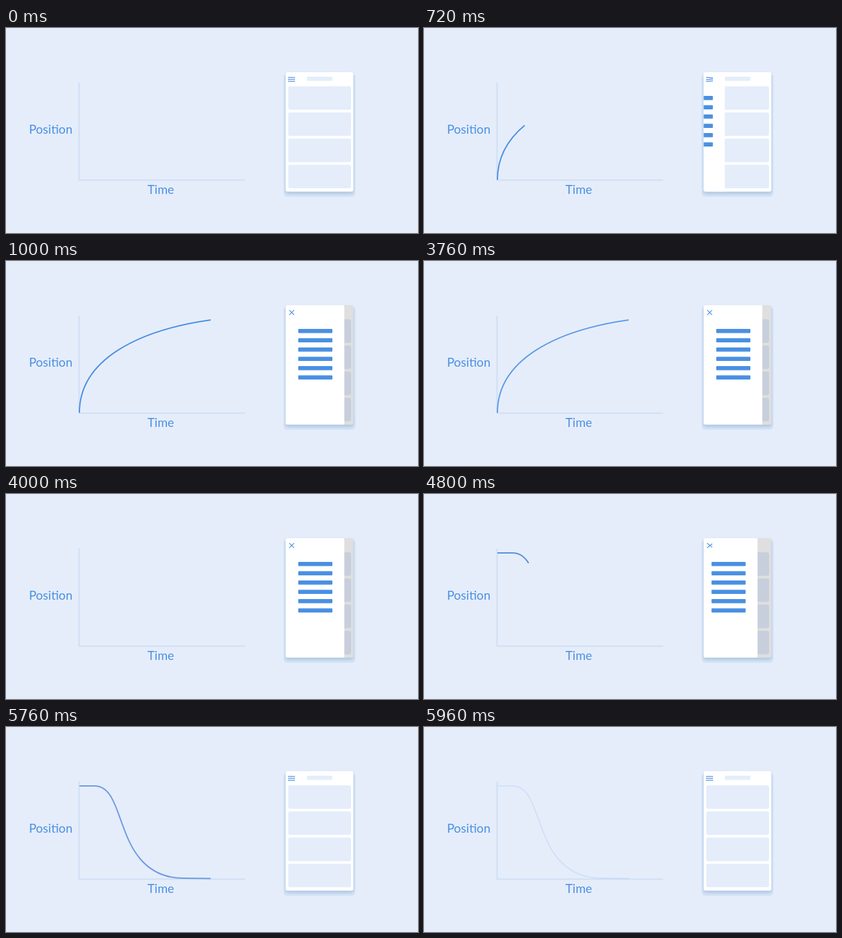
Animation of 640x320 px, one loop 6 s. Source, as an HTML page:

```html
<!DOCTYPE html>
<html lang="en">
<head>
<meta charset="utf-8">
<title>Menu easing</title>
<style>
  html, body { margin: 0; height: 100%; overflow: hidden; background: #e5edfb; }
  svg { display: block; width: 100vw; height: 100vh; }
  text { font: 19px Lato, "Open Sans", sans-serif; fill: #4a90e2; }
  .axis { stroke: #d0dff4; stroke-width: 2; fill: none; }
  .curve { stroke-width: 2; fill: none; }
  .shadow { fill: #fff; filter: drop-shadow(0 3px 2px #a9c4e3); }
  #icon { stroke: #4a90e2; stroke-width: 1.2; }
</style>
</head>
<body>
<svg viewBox="0 0 640 320">
  <clipPath id="screen"><rect x="434.5" y="69" width="105" height="186.5" rx="3"/></clipPath>

  <path class="axis" d="M113.5 85V237.5H371.5"/>
  <text x="35.7" y="165">Position</text>
  <text x="219.7" y="259">Time</text>
  <path id="rise" class="curve" stroke="#4a90e2" pathLength="1"
    d="M114 237C114 154 205 108 318 92"/>
  <path id="fall" class="curve" stroke="#5a8fda" pathLength="1"
    d="M114 92H138C162 92 170 123 180 150C190 177 208 236 276 236L318 236.5"/>

  <rect x="431.5" y="72" width="111" height="191.5" rx="5" fill="#d6e3f5"/>
  <rect class="shadow" x="434.5" y="69" width="105" height="186.5" rx="3"/>
  <g clip-path="url(#screen)">
    <g id="cards" fill="#e5edfb">
      <rect x="467.5" y="76" width="39.5" height="6.5" rx="1"/>
    </g>
    <rect id="dim" x="434" y="69" width="106" height="187"/>
    <g id="menu" fill="#4a90e2">
      <rect x="420" y="69" width="105.5" height="186.5" rx="1.5" fill="#fff"/>
    </g>
  </g>
  <g id="icon"><line/><line/><line/></g>
</svg>
<script>
const $ = id => document.getElementById(id);
const clamp = v => Math.min(1, Math.max(0, v));
const lerp = (a, b, p) => a + (b - a) * p;
const STEP = 40, LOOP = 6000;

function addRect(parent, x, y, width, height, rx) {
  const rect = document.createElementNS('http://www.w3.org/2000/svg', 'rect');
  for (const [name, value] of Object.entries({ x, y, width, height, rx })) rect.setAttribute(name, value);
  parent.append(rect);
}
for (let i = 0; i < 4; i++) addRect($('cards'), 438.5, 91 + i * 40.8, 97.5, 36.8, 3);
for (let i = 0; i < 6; i++) addRect($('menu'), 454, 106 + i * 14.5, 53, 6.4, 1);

function drawCurve(path, trim, opacity) {
  path.style.strokeDasharray = `${trim} 2`;
  path.style.opacity = trim ? opacity : 0;
}

// Top, middle and bottom bars: menu pose and cross pose as x1, y1, x2, y2
const bars = [
  [[438, 77.2, 449, 77.2], [440, 76.7, 447.5, 84.2]],
  [[438, 80.2, 449, 80.2], [440, 84.2, 447.5, 76.7]],
  [[438, 83.2, 449, 83.2], [440, 84.2, 447.5, 76.7]]
];
function drawIcon(p) {
  [...$('icon').children].forEach((line, i) => {
    const [from, to] = bars[i];
    ['x1', 'y1', 'x2', 'y2'].forEach((name, j) => line.setAttribute(name, lerp(from[j], to[j], p)));
    line.style.opacity = i === 1 ? clamp(1.2 - 2 * p) : 1;
  });
}

function draw(time) {
  const t = Math.floor(time % LOOP / STEP) * STEP;
  const steps = start => (t - start) / STEP;
  const fade = start => 1 - clamp((steps(start) + 1) / 7);
  let open = 0, dim = 0, cross = 0, rise = 0, fall = 0, tint = 0;

  if (t >= 720 && t < 4800) {
    const k = steps(720);
    open = rise = 1 - (1 - clamp(.2 + .8 * k / 7)) ** 2;
    dim = clamp(k / 7);
    cross = clamp((k + .8) / 7.8);
  } else if (t >= 4800) {
    const k = steps(4800), p = clamp(.175 + .213 * k);
    open = 1 - p * p * (3 - 2 * p);
    dim = 1 - clamp((k + 1) / 6) ** 2.6;
    tint = 1 - dim;
    cross = clamp(.85 - .2 * k);
    fall = k < 3 ? lerp(.194, .524, k / 3) : lerp(.524, 1, clamp((k - 3) / 2));
  }

  drawCurve($('rise'), rise, fade(3760));
  drawCurve($('fall'), fall, fade(5760));
  $('menu').setAttribute('transform', `translate(${-91 * (1 - open)} 0)`);
  $('menu').style.opacity = open ? 1 : 0;
  $('dim').style.fill = `rgb(0 ${255 * tint} ${clamp(1.9 * tint) * 255})`;
  $('dim').style.opacity = .125 * dim;
  drawIcon(cross);
}

let begin;
function tick(now) {
  begin ??= now;
  draw(now - begin);
  requestAnimationFrame(tick);
}
draw(0);
requestAnimationFrame(tick);
</script>
</body>
</html>
```
